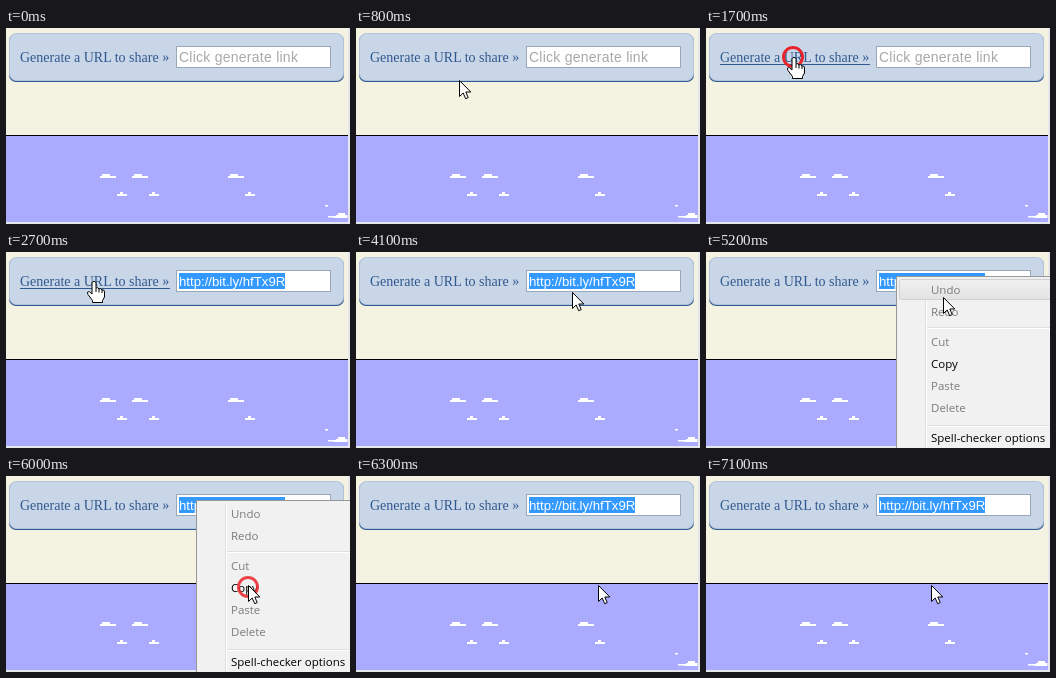
Recreate the animation shown at these times as an HTML page. Size 344 by 196 pixels, loop 7.2 s.

```html
<!DOCTYPE html>
<html lang="en">
<head>
<meta charset="utf-8">
<title>Share a link</title>
<style>
  html, body { margin: 0; width: 100%; height: 100%; overflow: hidden; background: #f4f2e0; }
  svg { display: block; width: 100vw; height: 100vh; }
  text { white-space: pre; }
  .link { font: 14px "Liberation Serif", Times, serif; fill: #30598f; }
  .field { font: 13.2px "Liberation Sans", Arial, sans-serif; }
  .hint { font-size: 14px; letter-spacing: .25px; fill: #a8a8a8; }
  .menu text { font: 11.5px "Open Sans", "Noto Sans", sans-serif; fill: #7c7c7c; }
  .menu .on { fill: #000; }
  .cursor { fill: #fff; stroke: #000; stroke-width: 1; stroke-linejoin: round; }
</style>
</head>
<body>
<svg viewBox="0 0 344 196" preserveAspectRatio="none">
  <defs>
    <linearGradient id="row" x2="0" y2="1">
      <stop stop-color="#f0f0f0"/><stop offset="1" stop-color="#e2e2e2"/>
    </linearGradient>
    <g id="cloud" fill="#fff"><path d="M0 2H2V0H10V2H16V4H0Z"/></g>
    <g id="puff" fill="#fff"><path d="M0 1H3V-1H6V1H10V3H0Z"/></g>
  </defs>

  <rect width="344" height="196" fill="#f4f2e0"/>
  <rect x="3" y="6" width="335" height="48" rx="7" fill="#2f5b92"/>
  <rect x="3.5" y="5.5" width="334" height="47" rx="7" fill="#c8d6e8" stroke="#b3c4dc"/>

  <text class="link" x="14" y="34">Generate a URL to share »</text>
  <path id="underline" d="M14 36.5H164" stroke="#30598f"/>

  <rect x="170.5" y="18.5" width="154" height="21" fill="#fff" stroke="#98a6b8"/>
  <text id="hint" class="field hint" x="173" y="34">Click generate link</text>
  <g id="url">
    <rect x="173" y="21" width="106" height="16" fill="#3399ff"/>
    <text class="field" x="173" y="34" fill="#fff">http://bit.ly/hfTx9R</text>
  </g>

  <rect y="107" width="342" height="87" fill="#aaaaff"/>
  <path d="M0 107.5H342" stroke="#000"/>
  <g id="sky"></g>
  <path d="M319 177H322V178.5H319ZM322 188H330V187H332V185H339V187H341.500V190H328V189.500H322Z" fill="#fff"/>
  <path d="M342 0H344V196H0V194H342Z" fill="#e6e7ec"/>

  <g id="menu" class="menu">
    <rect x="190.500" y="24.500" width="170" height="190" fill="#f1f1f1" stroke="#979797"/>
    <path d="M219.500 27V196M219 75.500H344M219 173.500H344" stroke="#dedede"/>
    <path d="M220.500 27V196M220 76.500H344M220 174.500H344" stroke="#fff"/>
    <rect id="hover" x="193.500" width="160" height="20" rx="2" fill="url(#row)" stroke="#d0d0d0"/>
    <g id="items"></g>
  </g>

  <circle id="ring" r="9.500" fill="none" stroke="#e8242a" stroke-width="3"/>
  <g id="cursor" class="cursor">
    <path id="arrow" d="M.5 .5V16.500L4.200 13 6.700 18.700 9.200 17.600 6.800 12H11.800Z"/>
    <g id="hand">
      <path d="M-2 1.500Q0 -1 2 1.500V7Q4 5.800 5 8Q7 6.800 8 9Q10.500 8.200 10.500 11V16L8.500 19.500V21.500H-1.500V19.500L-6 13.500Q-7.500 10 -4.500 10.800L-2 13Z"/>
      <path d="M2 7V11M5 8V11.500M8 9V12" fill="none"/>
    </g>
    <path id="beam" d="M-3 -8H-1L0 -7 1 -8H3M0 -7V7M-3 8H-1L0 7 1 8H3" fill="none"/>
  </g>
</svg>
<script>
  const LOOP = 7200, STEP = 100;
  const $ = id => document.getElementById(id);
  const show = (id, on) => $(id).setAttribute('visibility', on ? 'inherit' : 'hidden');

  const ease = {
    lin: p => p,
    in: p => p * p,
    out: p => 1 - (1 - p) ** 2,
    both: p => p * p * (3 - 2 * p)
  };

  // time, x, y, easing on the way there
  const path = [
    [100, 205, 200],
    [1200, 88, 29, 'out'],
    [3300, 88, 29, 'lin'],
    [3700, 150, 45, 'in'],
    [4100, 216, 40, 'out'],
    [4400, 190, 25, 'both'],
    [4900, 190, 25, 'lin'],
    [5200, 237, 45, 'lin'],
    [5800, 242, 109, 'out'],
    [6400, 242, 109, 'lin'],
    [7100, 225, 109, 'both']
  ];

  // start, full strength until, end, strength, centre
  const clicks = [
    [1700, 1900, 2000, 1, 87, 29],
    [4500, 4600, 4700, 1, 190, 25],
    [6000, 6100, 6200, .85, 242, 111]
  ];

  const items = [
    ['Undo', 42], ['Redo', 64], ['Cut', 94], ['Copy', 116, 'on'],
    ['Paste', 138], ['Delete', 160], ['Spell-checker options', 190, 'on']
  ];
  $('items').innerHTML = items.map(([name, y, state = '']) =>
    `<text x="225" y="${y}" class="${state}">${name}</text>`).join('');

  $('sky').innerHTML = [94, 126, 222].map(x =>
    `<use href="#cloud" x="${x}" y="146"/><use href="#puff" x="${x + 17}" y="165"/>`).join('');

  function pointer(t) {
    const i = path.findIndex(k => k[0] >= t);
    if (i < 1) return path[i < 0 ? path.length - 1 : 0].slice(1, 3);
    const a = path[i - 1], b = path[i];
    const p = ease[b[3]]((t - a[0]) / (b[0] - a[0]));
    return [1, 2].map(n => Math.round(a[n] + (b[n] - a[n]) * p));
  }

  const within = (x, y, l, t, r, b) => x >= l && x <= r && y >= t && y <= b;

  function draw(ms) {
    const t = Math.floor(ms % LOOP / STEP) * STEP;
    const [x, y] = pointer(t);
    const visible = t >= 200;
    const menu = t >= 4900 && t < 6300;
    const onLink = visible && !menu && within(x, y, 14, 22, 164, 38);
    const onField = visible && !menu && within(x, y, 171, 19, 324, 39);

    show('underline', onLink);
    show('hint', t < 2200);
    show('url', t >= 2200);
    show('menu', menu);

    const row = items.find(([, base, on]) => !on && within(x, y, 193, base - 15, 344, base + 6));
    show('hover', menu && row);
    if (row) $('hover').setAttribute('y', row[1] - 14.5);

    const click = clicks.find(c => t >= c[0] && t < c[2]);
    show('ring', click);
    if (click) {
      const [, full, , strength, cx, cy] = click;
      $('ring').setAttribute('transform', `translate(${cx} ${cy})`);
      $('ring').setAttribute('opacity', t < full ? strength : strength * .45);
    }

    show('cursor', visible);
    show('hand', onLink);
    show('beam', onField);
    show('arrow', visible && !onLink && !onField);
    $('cursor').setAttribute('transform', `translate(${x} ${y})`);
  }

  const start = performance.now();
  function tick() {
    draw(performance.now() - start);
    requestAnimationFrame(tick);
  }
  tick();
</script>
</body>
</html>
```
